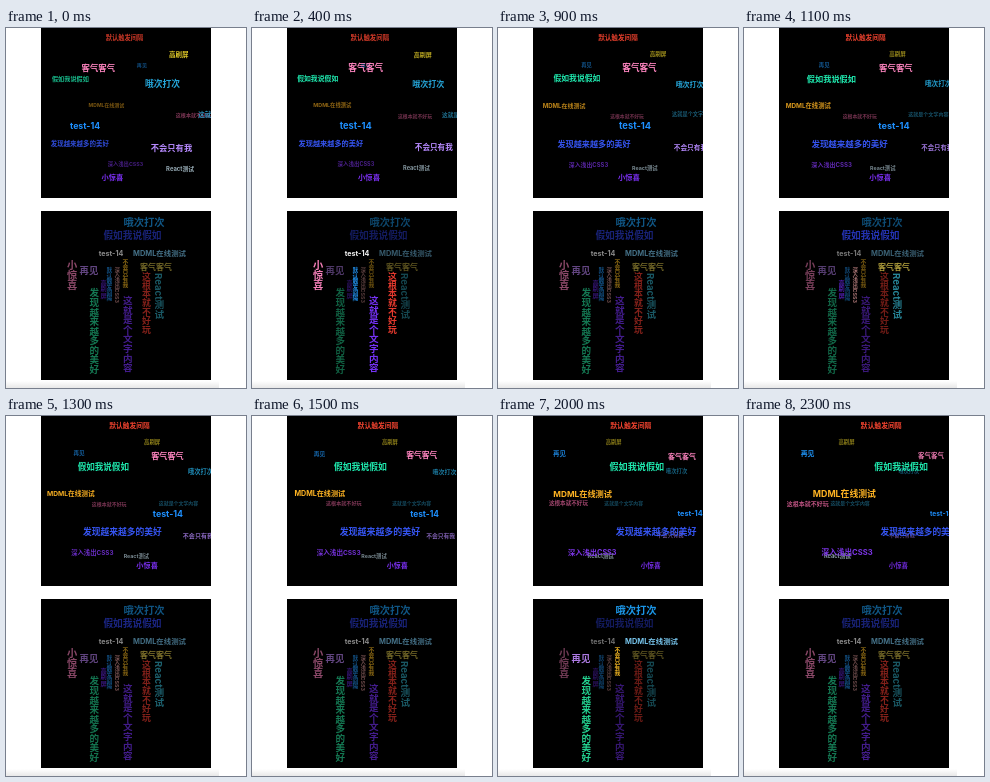
Animation of 240 by 360 pixels, one loop 2.4 s. Source, as an HTML page:

```html
<!DOCTYPE html>
<html lang="zh-CN">
<head>
<meta charset="utf-8">
<style>
html, body { margin: 0; width: 100%; height: 100%; overflow: hidden; background: #fff; }
body { position: relative; font: bold 10px/1 Inter, "Noto Sans CJK SC", "Noto Sans CJK", sans-serif; }
.panel { position: absolute; left: 35px; width: 170px; background: #000; overflow: hidden; }
#globe { top: 0; height: 170px; }
#cloud { top: 183px; height: 169px; }
.panel span { position: absolute; white-space: nowrap; transform: translate(-50%, -50%); }
.down { writing-mode: vertical-rl; }
#edge { position: absolute; top: 353px; width: 213px; height: 7px; background: linear-gradient(#fff, #e8e8e8); }
</style>
</head>
<body>
<div class="panel" id="globe"></div>
<div class="panel" id="cloud"></div>
<div id="edge"></div>
<script>
const LOOP = 2400, STEP = 100;

// text, colour, horizontal centre of its orbit; order sets the place on the spiral
const globeTags = [
  ['这根本就不好玩', '#ff6fae', 141],
  ['再见', '#1f93f5', 125],
  ['MDML在线测试', '#ffb423', 143],
  ['深入浅出CSS3', '#7d35e8', 139.5],
  ['React测试', '#d4f1ff', 130.5],
  ['这就是个文字内容', '#2fa8d8', 139],
  ['高刷屏', '#ffe52e', 121],
  ['默认触发间隔', '#f2432f', 134.5],
  ['假如我说假如', '#1fe8ae', 135.5],
  ['发现越来越多的美好', '#3554f0', 144],
  ['小惊喜', '#7a2ff0', 122],
  ['不会只有我', '#b78aff', 125],
  ['哦次打次', '#25a5d8', 121],
  ['客气客气', '#ff85c0', 122.5],
  ['test-14', '#1e90ff', 121]
];

// text, colour, centre x, centre y, size, flash group, vertical
const cloudTags = [
  ['哦次打次', '#1d9cf0', 138, 194, 10.3, 2],
  ['假如我说假如', '#2c3ed8', 126.5, 208, 9.7, 1],
  ['test-14', '#ffffff', 105, 226, 7.2, 0],
  ['MDML在线测试', '#7cccf5', 153.5, 225.5, 7.4, 2],
  ['客气客气', '#d2bd48', 150, 238.5, 8, 1],
  ['小惊喜', '#ff85c0', 65.5, 246.5, 10.3, 0, 1],
  ['再见', '#b37feb', 83, 243, 9.4, 2],
  ['发现越来越多的美好', '#25d895', 87.5, 303, 9.55, 2, 1],
  ['默认触发间隔', '#2292f0', 103, 256, 5.7, 0, 1],
  ['高刷屏', '#5b24c8', 97, 260.5, 6.2, 1, 1],
  ['深入浅出CSS3', '#c98a8a', 110.5, 257, 5.4, 1, 1],
  ['不会只有我', '#f5b823', 119, 244.5, 5.8, 2, 1],
  ['这就是个文字内容', '#7a34ff', 121, 305.5, 9.6, 0, 1],
  ['这根本就不好玩', '#f03c30', 139.5, 275, 8.9, 0, 1],
  ['React测试', '#2f9fb5', 152.5, 267.5, 9.6, 1, 1]
];

function addTag(panel, text, color) {
  const el = document.createElement('span');
  el.textContent = text;
  el.style.color = color;
  return panel.appendChild(el);
}

function place(el, x, y, size) {
  el.style.left = x + 'px';
  el.style.top = y + 'px';
  el.style.fontSize = size + 'px';
}

const globeItems = globeTags.map(([text, color, cx], i) => {
  const n = globeTags.length;
  const z = -1 + (2 * i + 1) / n;
  const phi = Math.acos(z), theta = Math.sqrt(n * Math.PI) * phi;
  const x = Math.cos(theta) * Math.sin(phi);
  return {
    el: addTag(globe, text, color),
    cx: cx - 35,
    y: 82.5 + 74.2 * Math.sin(theta) * Math.sin(phi),
    radius: 79 * Math.hypot(x, z),
    angle: Math.atan2(x, z)
  };
});

const cloudItems = cloudTags.map(([text, color, x, y, size, group, vertical]) => {
  const el = addTag(cloud, text, color);
  if (vertical) el.className = 'down';
  place(el, x - 35, y - 183, size);
  return { el, group };
});

function drawGlobe(t) {
  const turn = -0.27 + 0.00087 * t;
  for (const { el, cx, y, radius, angle } of globeItems) {
    const depth = radius * Math.cos(angle + turn);
    const scale = 240 / (240 - depth);
    place(el, cx + radius * Math.sin(angle + turn), y, 6.4 * scale);
    el.style.opacity = Math.min(1, scale * scale - 0.13);
    el.style.zIndex = Math.round(100 + depth);
  }
}

// one group lights up every 800 ms while the others fade a little
function drawCloud(t) {
  const active = Math.floor(t / 800);
  const off = Math.min(1, Math.abs(t % 800 - 370) / 170);
  const flash = (1 + Math.cos(Math.PI * off)) / 2;
  for (const { el, group } of cloudItems) {
    el.style.opacity = 0.55 + flash * (group === active ? 0.45 : -0.12);
  }
}

function frame() {
  const t = Math.floor(performance.now() % LOOP / STEP) * STEP;
  drawGlobe(t);
  drawCloud(t);
  requestAnimationFrame(frame);
}
frame();
</script>
</body>
</html>
```
